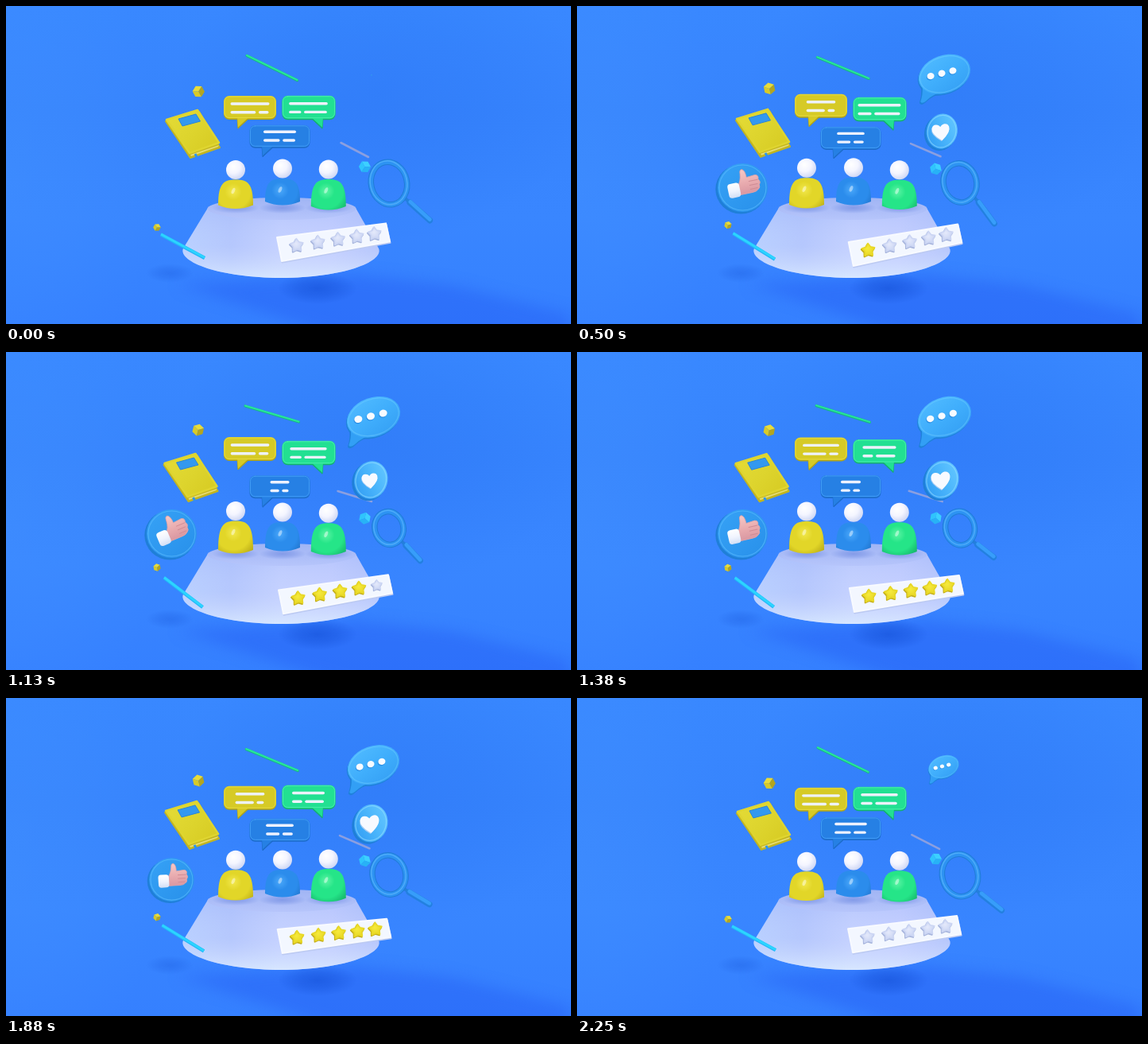
These frames come from a looping animation (711 by 400 pixels, 2.37 s). An HTML page with a canvas:

```html
<!DOCTYPE html>
<html lang="en">
<head>
<meta charset="utf-8">
<title>Feedback stage</title>
<style>
html, body { margin: 0; width: 100%; height: 100%; overflow: hidden; background: #3886ff; }
canvas { display: block; }
</style>
</head>
<body>
<canvas id="stage" width="711" height="400"></canvas>
<script>
const g = document.getElementById('stage').getContext('2d');
const LOOP = 2370, TAU = Math.PI * 2;
const lerp = (a, b, u) => a + (b - a) * u;

// Cosine over the loop, 1 at the given peak time
const swing = (t, peak, times = 1) => Math.cos(TAU * times * (t - peak) / LOOP);
const beat = t => Math.cos(TAU * (t - 750) / 880);

function ease(t, from, to) {
  const u = Math.min(1, Math.max(0, (t - from) / (to - from)));
  return u * u * (3 - 2 * u);
}
const pop = (t, in0, in1, out0, out1) => ease(t, in0, in1) - ease(t, out0, out1);

function shade(f, colors) {
  colors.forEach((c, i) => f.addColorStop(i / (colors.length - 1), c));
  return f;
}
const linear = (x0, y0, x1, y1, ...colors) => shade(g.createLinearGradient(x0, y0, x1, y1), colors);
const radial = (x, y, r, ...colors) => shade(g.createRadialGradient(x, y, 0, x, y, r), colors);

function line(color, width, path) {
  g.strokeStyle = color;
  g.lineWidth = width;
  g.lineJoin = 'round';
  g.stroke(path);
}

function fill(color, path, edge, width = 1) {
  g.fillStyle = color;
  g.fill(path);
  if (edge) line(edge, width, path);
}

function oval(x, y, rx, ry = rx, rot = 0) {
  const p = new Path2D();
  p.ellipse(x, y, rx, ry, rot, 0, TAU);
  return p;
}

function poly(...c) {
  const p = new Path2D();
  for (let i = 0; i < c.length; i += 2) p.lineTo(c[i], c[i + 1]);
  p.closePath();
  return p;
}

function box(x, y, w, h, r) {
  const p = new Path2D();
  p.roundRect(x, y, w, h, r);
  return p;
}

function rod(x0, y0, x1, y1, width, color, cap = 'round') {
  g.lineCap = cap;
  line(color, width, new Path2D(`M${x0} ${y0}L${x1} ${y1}`));
}

function placed(x, y, scale, rot, draw) {
  if (scale <= 0) return;
  g.save();
  g.translate(x, y);
  g.rotate(rot);
  g.scale(scale, scale);
  draw();
  g.restore();
}

function glow(x, y, rx, ry, rgb, alpha) {
  g.save();
  g.translate(x, y);
  g.scale(rx, ry);
  g.fillStyle = radial(0, 0, 1, `rgba(${rgb},${alpha})`, `rgba(${rgb},${alpha * .6})`, `rgba(${rgb},0)`);
  g.fillRect(-1, -1, 2, 2);
  g.restore();
}

function backdrop() {
  g.fillStyle = linear(0, 0, 0, 400, '#3988ff', '#3784fd', '#3986ff', '#3580ff');
  g.fillRect(0, 0, 711, 400);
  glow(0, 200, 190, 340, '70,150,255', .3);
  glow(470, 110, 260, 190, '24,96,232', .18);
  g.filter = 'blur(9px)';
  fill('rgba(36,92,244,.42)', poly(215, 350, 440, 338, 560, 351, 711, 388, 711, 420, 430, 420));
  g.filter = 'none';
  glow(392, 355, 50, 20, '20,80,214', .6);
  glow(206, 336, 30, 12, '30,95,225', .4);
}

function pedestal() {
  const p = new Path2D('M254 254 L223 305 C216 322 270 342 346 342 C422 342 476 322 469 305 L440 254 Z');
  fill(linear(222, 0, 470, 0, '#b8d0ff', '#b3c6fd', '#c4d1ff', '#c3ceff', '#b3c4fb'), p);
  fill(linear(0, 260, 0, 342, 'rgba(160,180,248,.3)', 'rgba(200,212,255,.1)', 'rgba(220,236,255,.8)'), p);
  fill(linear(0, 241, 0, 269, '#a0b4f4', '#b6c5fb'), oval(347, 255, 93.5, 14));
  for (const x of [289, 348, 406]) glow(x, 254, 30, 7, '86,116,215', .45);
}

function person(x, head, base, light, color, dark) {
  const top = head + 12.5, h = base - top;
  const p = new Path2D(`M${x - 22} ${base - 5} C${x - 22} ${top + h * .12} ${x - 15} ${top} ${x} ${top}
    C${x + 15} ${top} ${x + 22} ${top + h * .12} ${x + 22} ${base - 5} Q${x} ${base + 4} ${x - 22} ${base - 5}Z`);
  fill(radial(x - 3, top + 15, 32, light, color, color, dark), p);
  fill('rgba(255,255,255,.45)', oval(x - 3, top + 14, 2, 4, .4));
  fill(radial(x - 3, head - 4, 17, '#fff', '#f4f5ff', '#cdd6f4'), oval(x, head, 12));
}

function bubble(x, y, w, h, tail, side, light, color, dark) {
  const body = box(x, y, w, h, 7);
  const tip = poly(tail - side, y + h - 2, tail, y + h + 11, tail + side * 14, y + h - 2);
  placed(0, 1.5, 1, 0, () => {
    fill(dark, tip, dark);
    fill(dark, body);
  });
  fill(color, tip);
  fill(color, body);
  line(light, 1, box(x + 1, y + 1, w - 2, h - 2, 6));
}

// Two text bars; the second has a gap at the given share of its width
function bars(x, y, half, gap) {
  const l = x - half + 1.7, r = x + half - 1.7, m = lerp(l, r, gap), c = '#eef2ff';
  rod(l, y, r, y, 3.4, c);
  rod(l, y + 10.7, m - 3.5, y + 10.7, 3.4, c);
  rod(m + 3.5, y + 10.7, r - 1, y + 10.7, 3.4, c);
}

function book(w) {
  placed(-2.5 * w, -3 * w, 1, 0, () => {
    fill('#c2b520', poly(201, 145, 243, 133, 269, 178, 232, 191), '#c2b520', 2);
    fill('#e6dc70', poly(232, 187, 268, 175, 267, 177, 233, 189));
    fill(linear(205, 135, 265, 185, '#e4db36', '#ddd42d', '#d6ca22'),
      poly(202, 143, 241, 131, 268, 172, 231, 185), '#dfd52f', 2.5);
    fill('#3398f0', poly(217, 142, 239, 136, 244.5, 145, 222, 151), '#2a85d8');
    rod(238, 186, 240, 190, 3, '#2b95f0', 'butt');
  });
}

function cube(x, y, s, rot, top, left, right) {
  placed(x, y, s, rot, () => {
    fill(top, poly(0, -1, .87, -.5, 0, 0, -.87, -.5));
    fill(left, poly(-.87, -.5, 0, 0, 0, 1, -.87, .5));
    fill(right, poly(.87, -.5, 0, 0, 0, 1, .87, .5));
  });
}

function star(x, y, s, gold) {
  const c = [];
  for (let i = 0; i < 10; i++) {
    const a = i * TAU / 10 - Math.PI / 2 - .08, r = i % 2 ? 5 : 8.5;
    c.push(r * Math.cos(a), r * Math.sin(a));
  }
  const p = poly(...c), [light, color, dark] = gold
    ? ['#f6ea3c', '#e8d826', '#c4ad18'] : ['#e4e9fb', '#cbd5f3', '#a6b4dc'];
  placed(x - .7, y + 1.2, s, 0, () => fill(dark, p, dark, 2));
  placed(x, y, s, 0, () => fill(radial(-1, -2, 9, light, color), p, color, 1.6));
}

// Stars shrink, change colour and grow again, one after another
function rating(t, w) {
  const x1 = 366 + 2 * w, y1 = 305 + 5 * swing(t, 940);
  const x5 = 464 + 3 * w, y5 = 290 + 4 * swing(t, 1350);
  const face = (dx, dy) => poly(x1 - 25 + dx, y1 - 10 + dy, x5 + 14 + dx, y5 - 13 + dy,
    x5 + 19 + dx, y5 + 10 + dy, x1 - 19 + dx, y1 + 20 + dy);
  fill('#bccaf2', face(.5, 1.5), '#bccaf2', 2);
  fill('#f3f7ff', face(0, 0), '#f8faff', 2);
  for (let i = 0; i < 5; i++) {
    const on = 410 + 190 * i, off = 2130, u = .283 * i - .0083 * i * i;
    const near = Math.min(Math.abs(t - on), Math.abs(t - off));
    star(lerp(x1, x5, u), lerp(y1, y5, u), Math.min(1, .6 + near / 200), t >= on && t < off);
  }
}

function magnifier(t, w) {
  const ex = 527.5 + 7 * swing(t, 2150), ey = 265.5 + 8.5 * swing(t, 400);
  const y = 223 - 1.5 * w, rx = 22.5 - 4.5 * w, ry = 27 - 6 * w;
  const hx = 501 - 3 * w, hy = 241 - 3 * w;
  const mx = lerp(hx, ex, .22), my = lerp(hy, ey, .22);
  rod(hx - 2, hy - 2, mx, my, 4, '#247fdd');
  rod(mx, my, ex, ey, 7.5, '#2380e0');
  rod(mx + .7, my - 1, ex, ey - 1.2, 4.8, '#379dfa');
  const ring = oval(482, y, rx, ry, -.22);
  line('#207bd8', 7.5, ring);
  line('#2d93f2', 5.5, ring);
  line('rgba(110,195,255,.5)', 1.5, oval(481.5, y - .7, rx + .6, ry + .6, -.22));
}

function disc(rx, ry, rot, light, color) {
  fill('#1f7fd8', oval(-1.5, 1.5, rx, ry, rot));
  fill(color, oval(.7, -.5, rx - .5, ry - .5, rot));
  line(light, 1.2, oval(.7, -.5, rx - 2.5, ry - 2.5, rot));
}

function thumb(t) {
  const lean = Math.sin(Math.PI * Math.min(1, Math.max(0, (t - 350) / 1200)));
  placed(207.8, 229, pop(t, 0, 300, 1800, 2200), 0, () => {
    disc(32, 31, 0, 'rgba(95,190,255,.6)', linear(-31, -30, 31, 30, '#36a2f6', '#2890ea'));
    placed(0, 0, 1, -.06 - .38 * lean, () => {
      const skin = linear(0, -20, 0, 10, '#f4c4c2', '#e8aaae', '#d795a0');
      fill(skin, new Path2D('M-5 -4 Q0 -8 1 -18 Q1 -23 4 -23 Q8 -22 8 -12 L19 -13 Q24 -12 22 -7 Q25 -3 22 0 Q23 4 19 6 Q17 8 12 8 L-5 8Z'), '#e2a3a8', .8);
      for (let i = 0; i < 3; i++) rod(10, -6.5 + i * 5, 21 - i, -6.5 + i * 5, 1, '#cf8b94');
      fill(linear(0, -8, 0, 11, '#fff', '#f0f4fe', '#cfdcf4'), box(-18, -8, 15, 18, 4));
    });
  });
}

function heart(t, w) {
  placed(458.5, 156 + 5.5 * w, pop(t, 200, 560, 1950, 2250), 0, () => {
    disc(21.5, 24.5, .28, 'rgba(150,220,255,.6)', linear(-20, 10, 20, -10, '#349ff4', '#48b3fb', '#5fc4ff'));
    placed(-.5, 0, .82 + .18 * beat(t), -.12, () => {
      const p = new Path2D('M0 14 C-8 8 -16 1 -14 -7 C-12 -14 -3 -13 0 -6 C3 -13 12 -14 14 -7 C16 1 8 8 0 14Z');
      placed(-1, 1.3, 1, 0, () => fill('#a9cdf4', p, '#a9cdf4', 2));
      fill('#f8faff', p, '#f8faff', 2);
    });
  });
}

function comment(t, w) {
  const size = Math.max(.02, pop(t, 0, 430, 2150, 2380)) * (.97 + .05 * w);
  const gap = 13.7 - 1.8 * beat(t), dot = 4.5 - .5 * beat(t);
  placed(460 + 2 * size, 84.3 - 2.8 * swing(t, 1300), size, 0, () => {
    const tail = new Path2D('M-32 5 Q-24 16 -30 35 Q-28 38 -23 34 Q-13 24 0 22Z');
    const body = oval(.5, 0, 34, 24, -.35);
    placed(-1, 1.8, 1, 0, () => {
      fill('#1f82da', tail, '#1f82da');
      fill('#1f82da', body);
    });
    fill('#329ff5', tail);
    fill(linear(-20, -24, 18, 26, '#50bbff', '#40aefc', '#349ff4'), body);
    line('rgba(120,210,255,.4)', 1.2, oval(.5, 0, 32, 22, -.35));
    for (const i of [-1, 0, 1]) {
      const x = -3 + i * gap, y = -1 - i * gap * .24;
      fill('#2a8ee4', oval(x - .7, y + 1.2, dot, dot * .9, -.3));
      fill('#f8fbff', oval(x, y, dot, dot * .9, -.3));
    }
  });
}

function draw(t) {
  const w = .5 - .5 * swing(t, 0);
  backdrop();
  pedestal();

  rod(303 - 2 * w, 62.5 + 5.5 * w, 366.5 + 2 * w, 93.5 - 5.5 * w, 3.2, '#18b683');
  rod(303 - 2 * w, 62 + 5.5 * w, 366.5 + 2 * w, 93 - 5.5 * w, 2, '#27e79b');
  rod(421.5 - 4 * w, 172 + 3 * w, 456 + 4 * w, 190 - 2 * w, 2.6, '#8b9fe0');
  cube(242.3 - .5 * w, 107.5 - 9.5 * w, 7.6, -.5 + .75 * w, '#e8dc3a', '#d8ca28', '#b3a51f');
  cube(190, 278.5 - 7.5 * w, 4.8, .5 - .7 * w, '#e8dc3a', '#d8ca28', '#b3a51f');
  cube(451.5, 202.3 + 7 * w, 7.6, .55 + .7 * w, '#3cd0ff', '#2fc4fc', '#28b2f6');
  rod(195 + 4 * w, 287.5 - 3.5 * w, 250 - 2.5 * w, 317 + 4 * w, 4.4, '#20b4f8', 'butt');
  rod(195 + 4 * w, 287 - 3.5 * w, 250 - 2.5 * w, 316.5 + 4 * w, 3, '#2cd4ff', 'butt');
  book(w);

  const yy = 113 - 6 * w, gy = 112 + 2.8 * swing(t, 500), by = 149.8 + 5.5 * w;
  bubble(274, yy, 66, 28.5, 292, 1, '#e6da3c', '#d6ca26', '#b0a31a');
  bars(307, yy + 10, 21.2 + 3.3 * swing(t, 0, 2), .7);
  bubble(347.5, gy, 67, 29, 398, -1, '#48efa8', '#22e092', '#14b071');
  bars(380.5, gy + 10, 23.5 + 3.5 * swing(t, 500), .34);
  bubble(306.5, by, 76, 27.5, 323, 1, '#409cf6', '#2680e4', '#1d6cca');
  bars(344.5, by + 8.5, 20.5 - 8.5 * w, .55);

  person(289, 206 - 6 * w, 255.5 - 1.5 * w, '#f2e84c', '#e2d628', '#bcae18');
  person(348, 204.5 - 3 * w, 251, '#4aa8fa', '#2b8cec', '#2073cc');
  person(405.8, 204 + 2.5 * swing(t, 350), 257 - w, '#5cf5a4', '#25e588', '#16b86c');

  rating(t, w);
  magnifier(t, w);
  thumb(t);
  heart(t, w);
  comment(t, w);
}

// The picture advances every 125 ms, rounded up to 10 ms
const start = performance.now();
function tick() {
  const ms = (performance.now() - start) % LOOP;
  const step = Math.floor(Math.floor(ms / 10) / 12.5);
  draw(Math.ceil(step * 12.5) * 10);
  requestAnimationFrame(tick);
}
tick();
</script>
</body>
</html>
```
